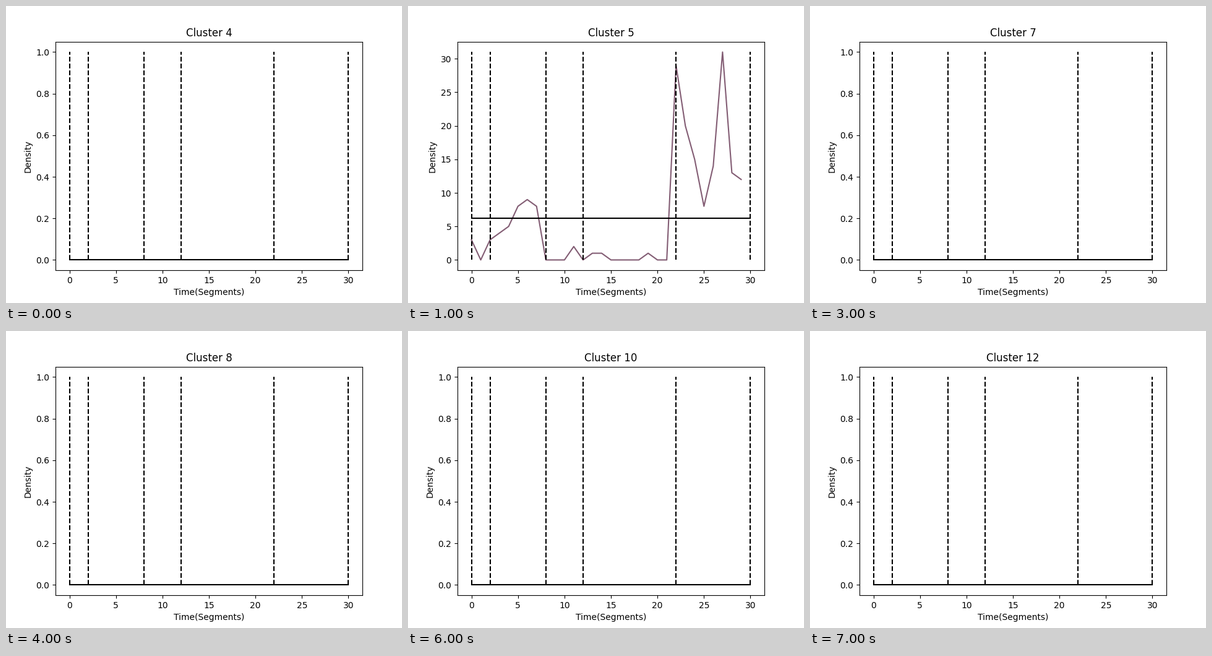
These frames come from a looping animation (640x480 px, 8 s). A matplotlib script:

```python
import matplotlib.pyplot as plt
from matplotlib.animation import FuncAnimation

CLUSTERS = [4, 5, 6, 7, 8, 9, 10, 12]
BOUNDS = [0, 2, 8, 12, 22, 30]

# Clusters not listed here have zero density throughout.
SERIES = {
    5: ("#835d74", [3, 0, 3, 4, 5, 8, 9, 8, 0, 0,
                    0, 2, 0, 1, 1, 0, 0, 0, 0, 1,
                    0, 0, 29, 20, 15, 8, 14, 31, 13, 12]),
    9: ("#0a328c", [15, 12, 69, 54, 63, 72, 70, 102, 12, 17,
                    20, 4, 46, 68, 96, 87, 67, 59, 61, 44,
                    58, 65, 16, 19, 10, 11, 9, 8, 28, 16]),
}

plt.rcParams["font.family"] = "DejaVu Sans"
fig, ax = plt.subplots(figsize=(6.4, 4.8), dpi=100)


def draw(i):
    cluster = CLUSTERS[i]
    ax.clear()
    low, high, mean = 0, 1, 0
    if cluster in SERIES:
        color, density = SERIES[cluster]
        ax.plot(density, color=color)
        low, high = min(density), max(density)
        mean = sum(density) / len(density)
    for x in BOUNDS:
        ax.plot([x, x], [low, high], "k--")
    ax.plot([BOUNDS[0], BOUNDS[-1]], [mean, mean], "k-")
    ax.set_title(f"Cluster {cluster}")
    ax.set_xlabel("Time(Segments)")
    ax.set_ylabel("Density")


anim = FuncAnimation(fig, draw, frames=len(CLUSTERS), init_func=lambda: draw(0),
                     interval=1000, repeat=True, repeat_delay=0)
plt.show()
```
